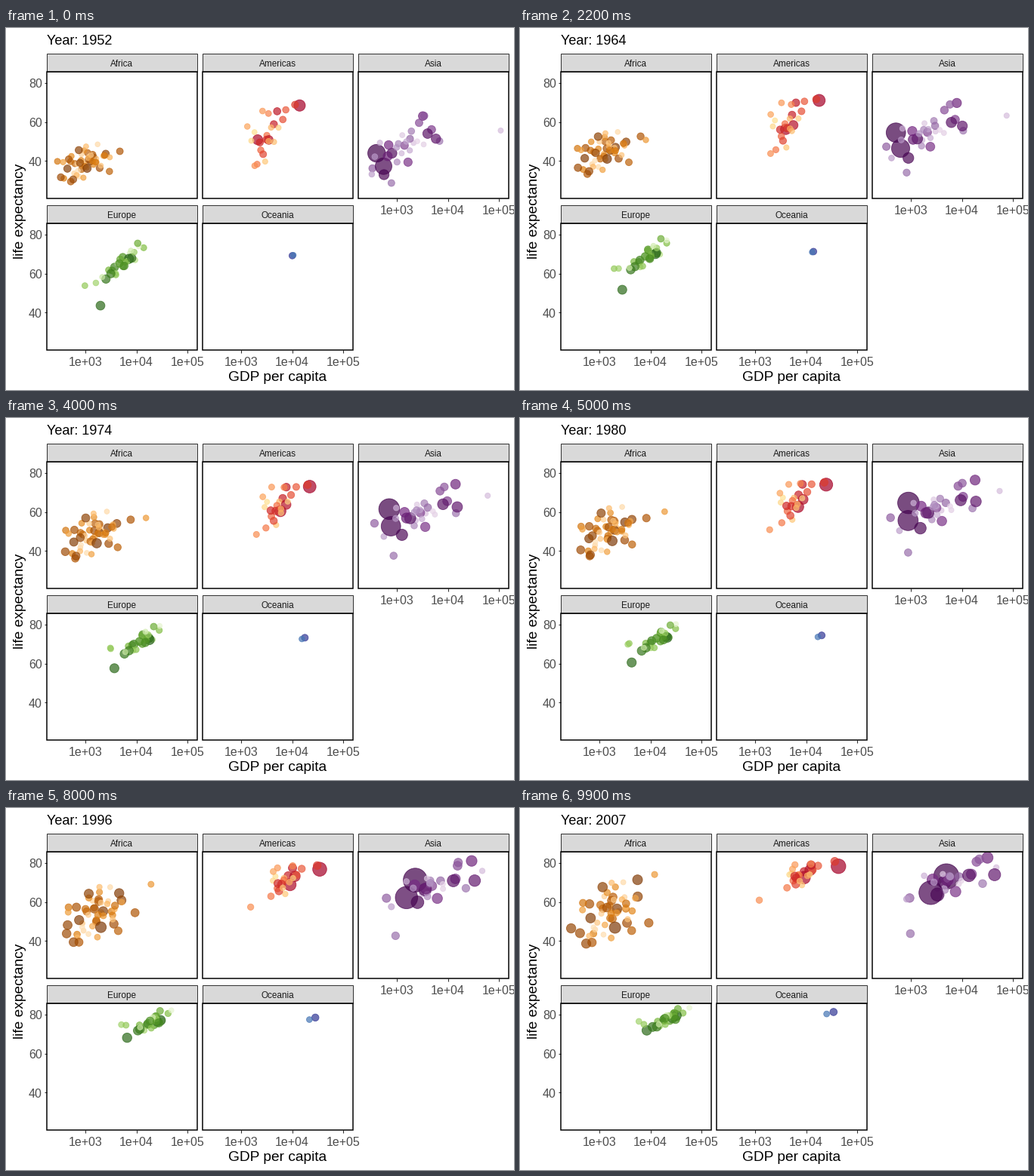
Animation, 672 px wide and 480 px high, one loop 10 s. Source, as a matplotlib script:

```python
import numpy as np
import matplotlib.pyplot as plt
from matplotlib.animation import FuncAnimation
from matplotlib.colors import LinearSegmentedColormap
from matplotlib.patches import Rectangle

plt.rcParams["font.family"] = "Liberation Sans"

W, H, DPI = 672, 480, 96
FRAMES, SURVEYS = 100, 12
PX = 72 / DPI
LEFT, TOP = 54.4, 58.2
STEP_X, STEP_Y = 206, 201
PANEL_W, PANEL_H, STRIP = 198.4, 168, 24.6
MAX_POP = 1319
U = np.linspace(0, 1, SURVEYS)


def curve(start, middle, end):
    """Parabola through three keys, sampled at every survey."""
    keys = np.array([start, middle, end], float)
    basis = [2 * (U - .5) * (U - 1), 4 * U * (1 - U), 2 * U * (U - .5)]
    return np.transpose(basis) @ keys


def path(start, middle, end):
    """Log GDP and life expectancy along a curve of (GDP, life) keys."""
    return curve(*[(np.log10(g), life) for g, life in (start, middle, end)])


def cloud(rng, n, centre, spread, tie):
    """Dots that drift around a moving centre; tie is the slope of the cloud."""
    v = np.linspace(-1, 1, n)
    z = 1.2 * v + .8 * v ** 3
    a, b, c = (rng.permutation(z) for _ in range(3))
    x = a + .35 * U[:, None] * (b - a)
    y = tie * x + np.sqrt(1 - tie ** 2) * c
    sx, sy = np.linspace(*spread, SURVEYS).T[:, :, None]
    offsets = np.stack([x * sx, y * sy], axis=2)
    wobble = rng.normal(size=offsets.shape) * (.015, .3)
    return path(*centre)[:, None] + offsets + wobble


def label(x, y, s, pt, color="black", ha="center", **kw):
    return ax.text(x, y, s, fontsize=pt, color=color, ha=ha, va="baseline",
                   zorder=5, **kw)


def tick(xs, ys):
    ax.plot(xs, ys, color="#333333", lw=1.1 * PX, solid_capstyle="butt")


class Panel:
    """One facet: a few leading dots plus a seeded cloud of n others."""

    def __init__(self, name, col, row, ramp, leaders, growth,
                 n=0, pops=(1, 1), **shape):
        self.x, self.y = LEFT + col * STEP_X, TOP + row * STEP_Y
        rng = np.random.default_rng(11 + 3 * col + row)
        pop = np.array([p for p, *_ in leaders], float)
        self.pos = np.stack([path(*keys) for _, *keys in leaders], axis=1)
        if n:
            top, low = pops
            q = np.linspace(0, 1, n) ** 1.4
            pop = np.append(pop, top * (low / top) ** q)
            self.pos = np.append(self.pos, cloud(rng, n, **shape), axis=1)

        # Shade follows population; stacking order does not.
        order = rng.permutation(len(pop))
        self.pos, pop = self.pos[:, order], pop[order]
        shade = np.argsort(np.argsort(-pop)) / (len(pop) - 1)
        rgba = LinearSegmentedColormap.from_list(name, ramp)(shade)
        rgba[:, 3] = .7
        self.size = [2 + 10 * np.sqrt(p / MAX_POP) for p in (pop / growth, pop)]

        self.frame(name)
        self.dots = ax.scatter(*np.zeros((2, len(pop))), c=rgba, edgecolors=rgba,
                               linewidths=.9 * PX, zorder=2)
        self.dots.set_clip_path(Rectangle((self.x, self.y), PANEL_W, PANEL_H,
                                          transform=ax.transData))

    def px(self, log_gdp):
        return self.x + (log_gdp - 2.248) / 2.941 * PANEL_W

    def py(self, life):
        return self.y + (85.55 - life) / 64.9 * (PANEL_H + .5)

    def frame(self, name):
        ax.add_patch(Rectangle((self.x, self.y - STRIP), PANEL_W, STRIP,
                               fc="#d9d9d9", ec="#333333", lw=PX, zorder=3))
        ax.add_patch(Rectangle((self.x, self.y), PANEL_W, PANEL_H, fc="none",
                               ec="black", lw=1.5 * PX, zorder=4))
        label(self.x + PANEL_W / 2 - .5, self.y - 7.5, name, 8.8, "#1a1a1a")

    def x_axis(self):
        bottom = self.y + PANEL_H
        for e in (3, 4, 5):
            tick([self.px(e)] * 2, [bottom, bottom + 3.7])
            label(self.px(e), bottom + 20.8, f"1e+0{e}", 12, "#4d4d4d")

    def y_axis(self):
        for v in (40, 60, 80):
            tick([self.x - 3.7, self.x], [self.py(v)] * 2)
            label(self.x - 6.6, self.py(v) + 6.4, str(v), 12, "#4d4d4d", ha="right")

    def move(self, u):
        t = u * (SURVEYS - 1)
        i = min(int(t), SURVEYS - 2)
        log_gdp, life = (self.pos[i] + (t - i) * (self.pos[i + 1] - self.pos[i])).T
        self.dots.set_offsets(np.column_stack([self.px(log_gdp), self.py(life)]))
        size = self.size[0] + u * (self.size[1] - self.size[0])
        self.dots.set_sizes((.72 * (size * 2.845 + .9)) ** 2)


fig = plt.figure(figsize=(W / DPI, H / DPI), dpi=DPI, facecolor="white")
ax = fig.add_axes([0, 0, 1, 1])
ax.set(xlim=(0, W), ylim=(H, 0))
ax.axis("off")

# Leaders: population in millions, then (GDP, life) at start, middle and end.
africa = Panel(
    "Africa", 0, 0, ["#7f3b08", "#b35806", "#e08214", "#fdb863", "#fee0b6"],
    [(135, (1077, 36.3), (1780, 45.2), (2014, 46.9)),
     (80, (1419, 41.9), (3130, 54.6), (5581, 71.3)),
     (65, (781, 39.1), (730, 47.8), (278, 46.5)),
     (44, (4725, 45), (8300, 56.9), (9270, 49.3)),
     (6, (2388, 42.7), (19000, 60), (12057, 74))],
    growth=3.7, n=47, pops=(76, .3),
    centre=((960, 39), (1420, 50), (1550, 55)),
    spread=((.25, 4.6), (.36, 8)), tie=.45)

americas = Panel(
    "Americas", 1, 0, ["#a50026", "#d73027", "#f46d43", "#fdae61", "#fee090"],
    [(301, (13990, 68.4), (24500, 73.9), (42952, 78.2)),
     (190, (2109, 50.9), (6900, 62.5), (9066, 72.4)),
     (109, (3478, 50.8), (8700, 66.3), (11978, 76.2)),
     (33, (11367, 68.8), (22500, 75), (36319, 80.7)),
     (8, (1840, 37.6), (1930, 50.8), (1202, 60.9))],
    growth=2.2, n=20, pops=(44, 1),
    centre=((3150, 54), (5500, 65.8), (7700, 74)),
    spread=((.18, 8), (.21, 3.2)), tie=.5)

asia = Panel(
    "Asia", 2, 0, ["#40004b", "#762a83", "#9970ab", "#c2a5cf", "#e7d4e8"],
    [(1319, (400, 44), (880, 64.5), (4959, 73)),
     (1110, (547, 37.4), (870, 55.5), (2452, 64.7)),
     (127, (3217, 63), (18000, 76.2), (31656, 82.6)),
     (48, (331, 36.3), (395, 57), (944, 62)),
     (32, (779, 28.8), (880, 39.2), (975, 43.8)),
     (2, (108382, 55.6), (55000, 70.6), (47307, 77.6))],
    growth=2.55, n=27, pops=(223, .7),
    centre=((1500, 48), (3600, 62), (6200, 71)),
    spread=((.34, 7.5), (.46, 5.3)), tie=.75)

europe = Panel(
    "Europe", 0, 1, ["#276419", "#4d9221", "#7fbc41", "#b8e186", "#e6f5d0"],
    [(82, (7144, 67.5), (21200, 73.2), (32170, 79.4)),
     (71, (1969, 43.6), (4250, 60.4), (8458, 71.8)),
     (5, (974, 53.8), (3800, 70.2), (7446, 74.9)),
     (4, (1601, 55.2), (3580, 69.7), (5937, 76.4))],
    growth=1.35, n=26, pops=(61, .3),
    centre=((5400, 65.7), (14800, 73), (23500, 78)),
    spread=((.2, 4.3), (.2, 2.6)), tie=.87)

oceania = Panel(
    "Oceania", 1, 1, ["#313695", "#4575b4"],
    [(20, (10039, 69.1), (20000, 74.3), (34435, 81.2)),
     (4, (10557, 69.4), (16850, 73.5), (25185, 80.2))],
    growth=2.2)

panels = [africa, americas, asia, europe, oceania]
for p in (asia, europe, oceania):
    p.x_axis()
for p in (africa, europe):
    p.y_axis()
label(359.5, 468.5, "GDP per capita", 14.3)
label(23, 243, "life expectancy", 14.3, rotation=90, rotation_mode="anchor")
title = label(LEFT, 21.8, "", 13.5, ha="left")


def update(i):
    u = i / (FRAMES - 1)
    title.set_text(f"Year: {round(1952 + 55 * u)}")
    for p in panels:
        p.move(u)
    return [title] + [p.dots for p in panels]


anim = FuncAnimation(fig, update, frames=FRAMES, interval=100, repeat=True)
plt.show()
```
